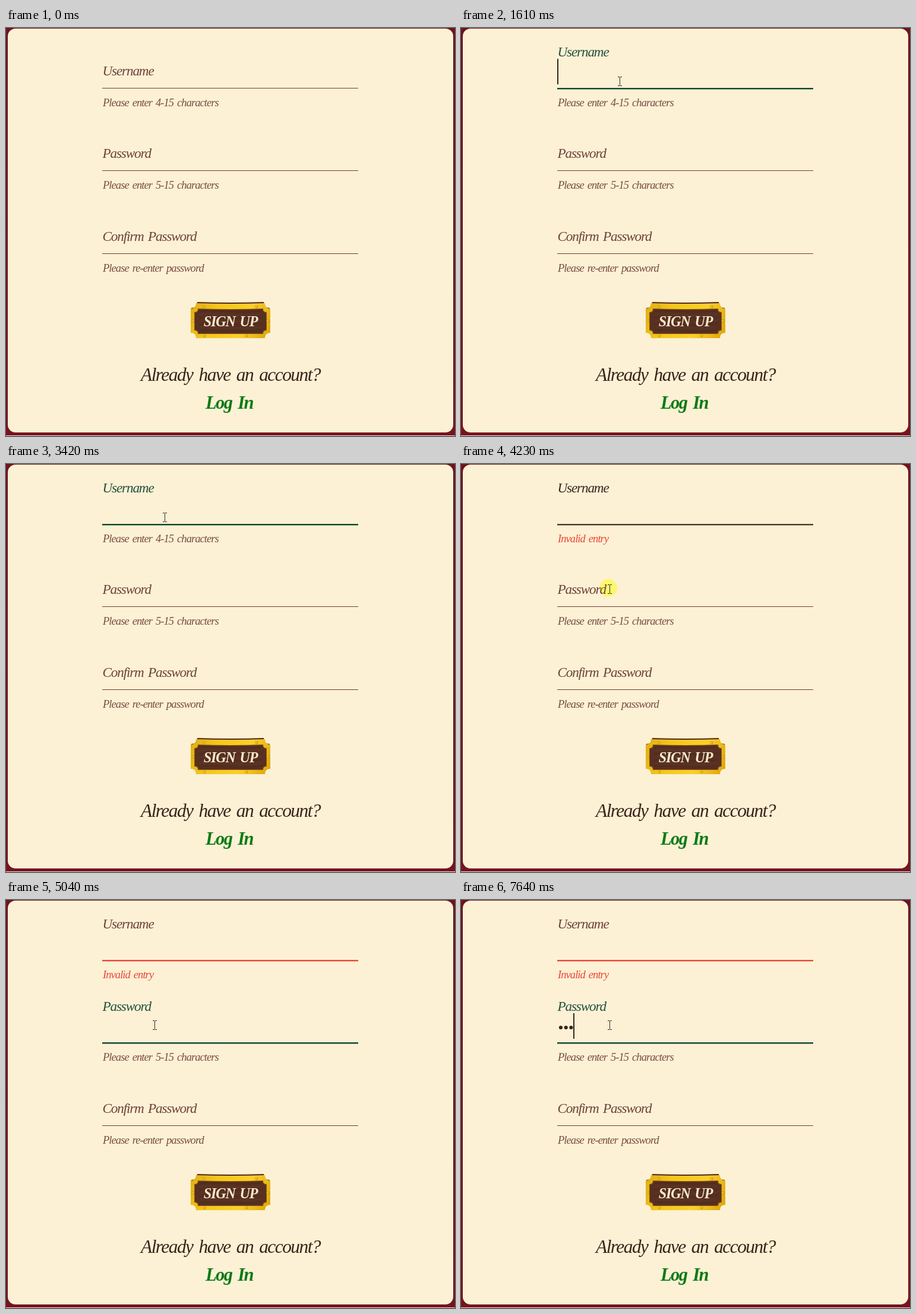
Animation of 756x688 px, one loop 8 s. Source, as an HTML page with a canvas:

```html
<!DOCTYPE html>
<html lang="en">
<head>
<meta charset="utf-8">
<title>Sign up</title>
<style>
html, body { margin: 0; width: 100%; height: 100%; overflow: hidden; background: #72141f; }
canvas { display: block; width: 756px; height: 688px; }
</style>
</head>
<body>
<canvas id="stage" width="756" height="688"></canvas>
<script>
const ctx = document.getElementById('stage').getContext('2d');
const LOOP = 8000;
const FONT = '"Liberation Serif", "Times New Roman", serif';
const BROWN = '#70423a', GREEN = '#0a4728', RED = '#ee4438', INK = '#3b241c';
const LEFT = 162, RIGHT = 593;

// Pointer stops: time, x, y, highlight shown
const pointer = [
  [390, 356, 212, 1], [590, 318, 142, 1], [790, 286, 102, 1], [1000, 270, 90, 1],
  [1190, 267, 89, 1], [1400, 267, 89, 0], [3620, 266, 102, 1], [3820, 260, 150, 1],
  [4030, 252, 198, 1], [4230, 250, 210, 1], [4430, 250, 210, 0]
];
// Value and caret of each field: time, content, caret visible
const userInput = [
  [1400, '', 1], [2000, 'g', 1], [2390, 'gu', 1], [2790, 'gum', 1], [3420, '', 0]
];
const passInput = [
  [4430, 0, 1], [5040, 0, 0], [5640, 0, 1], [6040, 0, 0],
  [6640, 1, 1], [6840, 2, 1], [7440, 2, 0], [7640, 3, 1]
];

function latest(list, t) {
  let hit = null;
  for (const row of list) if (row[0] <= t) hit = row;
  return hit;
}

function setFont(size, weight = 'normal') {
  ctx.font = `italic ${weight} ${size}px ${FONT}`;
  ctx.letterSpacing = (-size * 0.05).toFixed(2) + 'px';
  ctx.wordSpacing = (size * 0.12).toFixed(2) + 'px';
}

function text(str, x, y, size, color, weight, align = 'left') {
  setFont(size, weight);
  ctx.textAlign = align;
  ctx.fillStyle = color;
  ctx.fillText(str, x, y);
}

function rect(x, y, w, h, color) {
  ctx.fillStyle = color;
  ctx.fillRect(x, y, w, h);
}

function disc(x, y, r, color) {
  ctx.fillStyle = color;
  ctx.beginPath();
  ctx.arc(x, y, r, 0, Math.PI * 2);
  ctx.fill();
}

function card() {
  const g = ctx.createLinearGradient(0, 0, 0, 688);
  g.addColorStop(0, '#6d1420');
  g.addColorStop(1, '#77131f');
  rect(0, 0, 756, 687, g);
  rect(0, 687, 756, 1, '#f1e4e0');
  ctx.fillStyle = '#fcf1d5';
  ctx.beginPath();
  ctx.roundRect(3, 1, 750, 681, 13);
  ctx.fill();
}

function field(y, label, hint, s) {
  text(label, LEFT + 0.5, y - (s.raised ? 53 : 21), 23.2, s.label || BROWN);
  rect(LEFT, y, RIGHT - LEFT, s.line ? 2.4 : 1, s.line || '#743a34');
  text(s.error ? 'Invalid entry' : hint, LEFT + 1, y + 31, 18.5, s.error ? RED : '#7a4c43');
}

function caret(x, y) {
  rect(x, y - 49, 2, 43, INK);
}

// Plate with cut-in corners
function plate(x, y, w, h, c, fill) {
  const r = x + w, b = y + h;
  ctx.beginPath();
  ctx.moveTo(x + c, y);
  ctx.quadraticCurveTo(x + w / 2, y + 2, r - c, y);
  ctx.quadraticCurveTo(r - c, y + c, r, y + c);
  ctx.lineTo(r, b - c);
  ctx.quadraticCurveTo(r - c, b - c, r - c, b);
  ctx.lineTo(x + c, b);
  ctx.quadraticCurveTo(x + c, b - c, x, b - c);
  ctx.lineTo(x, y + c);
  ctx.quadraticCurveTo(x + c, y + c, x + c, y);
  ctx.closePath();
  ctx.fillStyle = fill;
  ctx.fill();
}

function button() {
  const gold = ctx.createLinearGradient(311, 462, 445, 523);
  gold.addColorStop(0, '#e0ad12');
  gold.addColorStop(0.3, '#f4c61c');
  gold.addColorStop(0.65, '#fbd02a');
  gold.addColorStop(1, '#dba30a');
  plate(312, 462, 132, 58, 10, '#55261d');
  plate(311, 464, 134, 59, 9, gold);
  plate(317, 473, 122, 43, 6, '#8a5a0c');
  plate(318, 474, 120, 41, 6, '#573022');

  ctx.lineWidth = 1;
  for (let i = 0; i < 7; i++) {
    const y = 478 + i * 5.4;
    ctx.strokeStyle = i % 2 ? '#633728' : '#4a271c';
    ctx.beginPath();
    ctx.moveTo(325, y);
    ctx.bezierCurveTo(350, y - 3, 390, y + 4, 431, y - 1);
    ctx.stroke();
  }
  for (const [x, y] of [[333, 470], [422, 470], [315, 494], [441, 494], [334, 519], [405, 519]]) {
    disc(x, y, 2.4, '#c4920f');
    disc(x - 0.3, y - 0.3, 1.5, '#f5cc35');
  }
  text('SIGN UP', 378, 503, 24.2, '#f9eccd', 'bold', 'center');
}

function ibeam(x, y) {
  const c = '#2b2a28';
  rect(x, y - 6, 1, 14, c);
  for (const dy of [-7, 8]) {
    rect(x - 3, y + dy, 3, 1, c);
    rect(x + 1, y + dy, 3, 1, c);
  }
}

function draw(t) {
  const p = latest(pointer, t);
  const user = latest(userInput, t);
  const pass = latest(passInput, t);
  const inUser = t >= 1610, blurred = t >= 4230, settled = t >= 4430, inPass = t >= 4630;

  card();
  if (p && p[3]) disc(p[1] - 2, p[2] - 1, 15, '#fdf76f');

  field(101, 'Username', 'Please enter 4-15 characters', {
    raised: inUser,
    error: blurred,
    label: !inUser || settled ? BROWN : blurred ? '#38271f' : '#25503b',
    line: !inUser ? null : settled ? RED : blurred ? '#4c3b28' : GREEN
  });
  field(240, 'Password', 'Please enter 5-15 characters', {
    raised: inPass,
    label: inPass ? '#25503f' : BROWN,
    line: inPass ? '#0d4531' : null
  });
  field(380, 'Confirm Password', 'Please re-enter password', {});

  if (user && !blurred) {
    text(user[1], LEFT + 1, 81, 23.2, INK);
    if (user[2]) caret(LEFT + Math.round(ctx.measureText(user[1]).width), 101);
  }
  if (pass) {
    for (let i = 0; i < pass[1]; i++) disc(168 + i * 8.7, 215, 3.1, INK);
    if (pass[2]) caret(LEFT + pass[1] * 9, 240);
  }

  button();
  text('Already have an account?', 378, 595, 31.5, INK, 'normal', 'center');
  text('Log In', 376, 642, 30.5, '#0b7a14', 'bold', 'center');
  if (p) ibeam(p[1], p[2]);
}

const start = performance.now();
function tick() {
  draw((performance.now() - start) % LOOP);
  requestAnimationFrame(tick);
}
tick();
</script>
</body>
</html>
```
